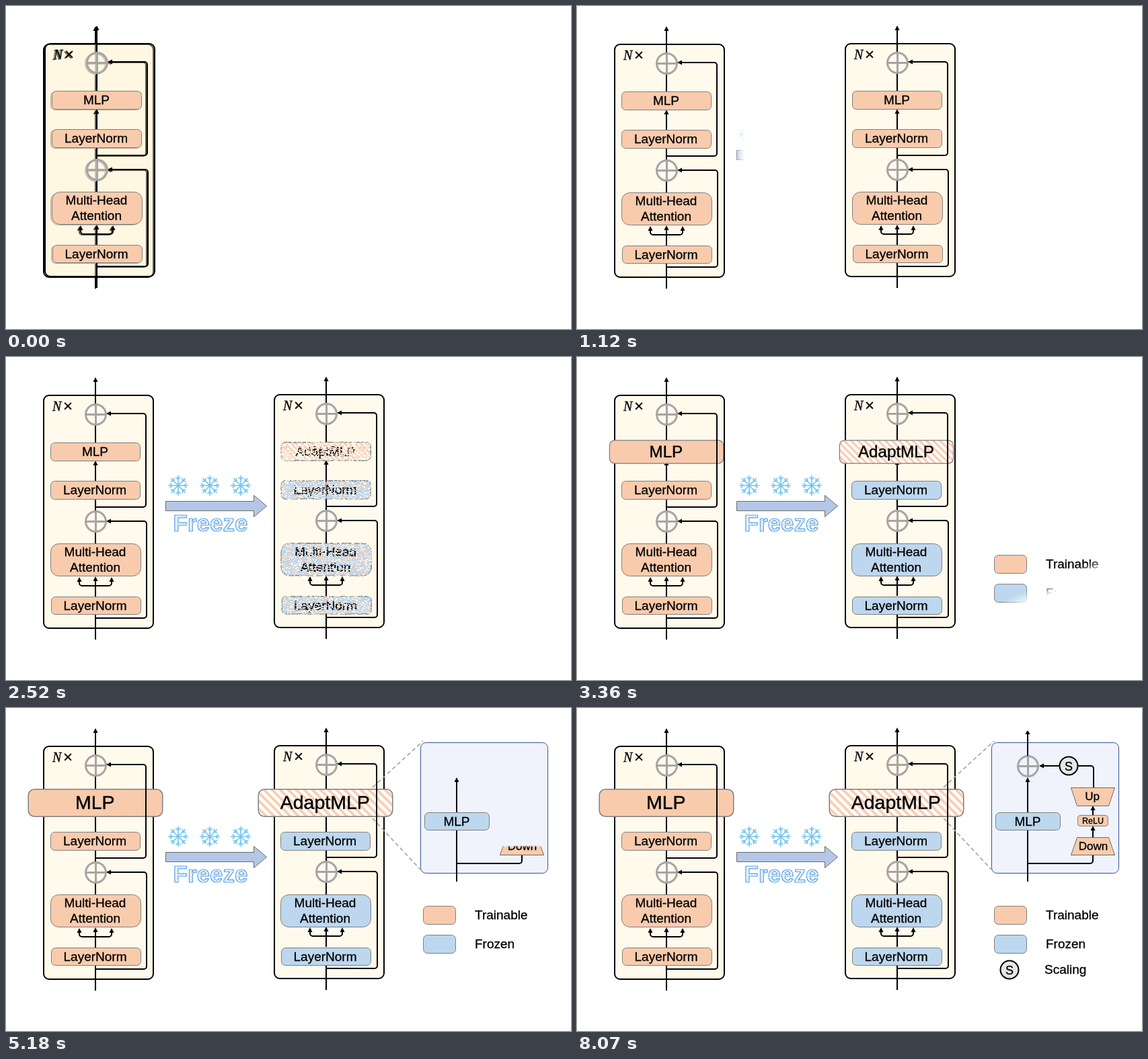
Write an HTML page with a canvas that moves like this. It is 840 by 480 pixels and loops after 8140 ms.

```html
<!DOCTYPE html>
<html lang="en">
<head>
<meta charset="utf-8">
<title>AdaptMLP</title>
<style>
  html, body { margin: 0; width: 100%; height: 100%; overflow: hidden; background: #fff; }
  canvas { display: block; }
</style>
</head>
<body>
<canvas id="stage" width="840" height="480"></canvas>
<script>
const LOOP = 8140, STEP = 70;
const PEACH = '#f8cbad', BLUE = '#bdd7ee', GREY = '#a5a5a5', EDGE = '#7f7f7f';
const SANS = '"Liberation Sans", Arial, sans-serif';
const SERIF = '"Liberation Serif", "Times New Roman", serif';

const screen = document.getElementById('stage').getContext('2d');
const layer = newCanvas(840, 480);
let g = screen, now = 0;

function newCanvas(w, h) {
  const c = document.createElement('canvas');
  c.width = w;
  c.height = h;
  return c.getContext('2d');
}

const progress = (from, to) => Math.min(1, Math.max(0, (now - from) / (to - from)));

// Diagonal hatching running down to the right
function hatch(size, width, color) {
  const c = newCanvas(size, size);
  c.fillStyle = '#fff';
  c.fillRect(0, 0, size, size);
  c.strokeStyle = color;
  c.lineWidth = width;
  for (const k of [-size, 0, size]) {
    c.moveTo(k - size, -size);
    c.lineTo(k + 2 * size, 2 * size);
  }
  c.stroke();
  return c.createPattern(c.canvas, 'repeat');
}
const STRIPES = hatch(8, 2.6, PEACH), FINE = hatch(4, 1, '#9cc8f0');

function paint(fill, stroke, width = 1) {
  if (fill) { g.fillStyle = fill; g.fill(); }
  if (stroke) { g.strokeStyle = stroke; g.lineWidth = width; g.stroke(); }
}

// A hairline outline gives the slightly heavy text weight
function text(str, x, y, size = 19, align = 'center', font = `${size}px ${SANS}`) {
  g.font = font;
  g.textAlign = align;
  g.fillStyle = g.strokeStyle = '#000';
  g.lineWidth = 0.3;
  g.fillText(str, x, y);
  g.strokeText(str, x, y);
}

function box(x, y, w, h, r, fill, stroke = EDGE, width = 1) {
  g.beginPath();
  g.roundRect(x, y, w, h, r);
  paint(fill, stroke, width);
}

function polygon(points, fill, stroke = EDGE) {
  g.beginPath();
  points.forEach(([x, y]) => g.lineTo(x, y));
  g.closePath();
  paint(fill, stroke);
}

// Polyline with rounded corners
function line(...points) {
  g.beginPath();
  g.moveTo(...points[0]);
  for (let i = 1; i < points.length - 1; i++) g.arcTo(...points[i], ...points[i + 1], 4);
  g.lineTo(...points.at(-1));
  paint(null, '#000', 2);
}

function arrow(...points) {
  const [x, y] = points.at(-1), [px, py] = points.at(-2);
  const ux = Math.sign(x - px), uy = Math.sign(y - py);
  const bx = x - 7 * ux, by = y - 7 * uy;
  line(...points.slice(0, -1), [bx, by]);
  polygon([[x, y], [bx + 3.5 * uy, by + 3.5 * ux], [bx - 3.5 * uy, by - 3.5 * ux]], '#000', null);
}

function plus(x, y) {
  g.beginPath();
  g.arc(x, y, 15, 0, 7);
  g.moveTo(x - 15, y);
  g.lineTo(x + 15, y);
  g.moveTo(x, y - 15);
  g.lineTo(x, y + 15);
  paint(null, GREY, 3);
}

function scaleSign(x, y) {
  g.beginPath();
  g.arc(x, y, 13.5, 0, 7);
  paint('#e7e6e6', '#000', 2);
  text('S', x, y + 6.5, 18);
}

// Runs draw on a separate layer, masks it, then puts it on the stage
function masked(draw, mask) {
  const main = g;
  g = layer;
  g.resetTransform();
  g.clearRect(0, 0, 840, 480);
  g.setTransform(main.getTransform());
  draw();
  g.resetTransform();
  mask();
  g = main;
  g.save();
  g.resetTransform();
  g.drawImage(layer.canvas, 0, 0);
  g.restore();
}

// Soft-edged reveal from point a to point b
function wipe(from, to, [ax, ay], [bx, by], draw, soft = 0.1) {
  const p = progress(from, to);
  if (p === 0) return;
  if (p === 1) return draw();
  masked(draw, () => {
    const head = p * (1 + soft), tail = head - soft;
    const at = k => [ax + (bx - ax) * k, ay + (by - ay) * k];
    const fade = g.createLinearGradient(...at(tail), ...at(head));
    fade.addColorStop(0, '#000');
    fade.addColorStop(1, 'transparent');
    g.globalCompositeOperation = 'destination-in';
    g.fillStyle = fade;
    g.fillRect(0, 0, 840, 480);
    g.globalCompositeOperation = 'source-over';
  });
}

// Keeps a random share of the pixels in the right-hand block
function dissolve(share, seed, draw) {
  if (share === 0) return;
  if (share === 1) return draw();
  masked(draw, () => {
    for (let y = 120; y < 390; y++) {
      for (let x = 404; x < 548; x += 2) {
        seed = (seed * 16807) % 2147483647;
        if (seed / 2147483647 > share) g.clearRect(x, y, 2, 1);
      }
    }
  });
}

function mlpBox(label, fill) {
  const s = 1 + 0.5 * progress(2870, 3770);
  g.save();
  g.translate(133, 141);
  g.scale(s, s);
  box(-66.5, -13.5, 133, 27, 6, fill);
  text(label, -0.5, 6.2);
  g.restore();
}

function layers(fill, mlpLabel, mlpFill) {
  box(66.5, 184.5, 133, 27, 6, fill);
  text('LayerNorm', 132, 204);
  box(66.5, 277.5, 134, 48, 12, fill);
  text('Multi-Head', 132.5, 296);
  text('Attention', 132.5, 319);
  box(67.5, 356.5, 133, 26, 6, fill);
  text('LayerNorm', 132.5, 376);
  mlpBox(mlpLabel, mlpFill);
}

function block(x, y, drawLayers) {
  g.save();
  g.translate(x, y);
  box(56, 57, 163, 346, 8, 'rgba(255,242,204,.38)', '#000', 2);
  text('N', 69, 80, 20, 'left', `italic 20px ${SERIF}`);
  text('×', 85, 81, 24, 'left');

  arrow([133, 127], [133, 30]);
  arrow([133, 212], [133, 154]);
  line([133, 278], [133, 212]);
  line([133, 420], [133, 383]);
  arrow([133, 356], [133, 326]);
  arrow([133, 340], [109, 340], [109, 327]);
  arrow([133, 340], [157, 340], [157, 327]);
  plus(133.5, 85.5);
  plus(133.5, 244.5);
  drawLayers();
  arrow([133, 223], [208, 223], [208, 84], [149, 84]);
  arrow([133, 388], [209, 388], [209, 244], [149, 244]);
  g.restore();
}

function rightLayers() {
  const p = progress(2200, 2760);
  dissolve(1 - p, 11, () => layers(PEACH, 'MLP', PEACH));
  g.translate(-p, p);
  dissolve(p, 7, () => layers(BLUE, 'AdaptMLP', STRIPES));
  g.translate(p, -p);
}

function snowflake(x, y) {
  g.save();
  g.translate(x, y);
  g.beginPath();
  for (let i = 0; i < 8; i++) {
    g.moveTo(0, 0);
    g.lineTo(15, 0);
    g.moveTo(12.5, -3.5);
    g.lineTo(9, 0);
    g.lineTo(12.5, 3.5);
    g.rotate(Math.PI / 4);
  }
  paint(null, '#74c6f0', 1.7);
  g.restore();
}

function freeze() {
  [256, 303, 349].forEach(x => snowflake(x, 191));
  polygon([[237.5, 214.5], [368.5, 214.5], [368.5, 205.5], [387.5, 221.5],
    [368.5, 237.5], [368.5, 228.5], [237.5, 228.5]], '#b4c7e7', '#6b6b6b');
  g.font = `bold 35px ${SANS}`;
  g.textAlign = 'center';
  g.lineJoin = 'round';
  g.fillStyle = FINE;
  g.fillText('Freeze', 304, 258.5);
  g.strokeStyle = '#5ba3e2';
  g.lineWidth = 1.2;
  g.strokeText('Freeze', 304, 258.5);
  g.lineJoin = 'miter';
}

function legend() {
  [[PEACH, 'Trainable', 294.5], [BLUE, 'Frozen', 337.5]].forEach(([fill, label, y]) => {
    box(620.5, y, 48, 27, 6, fill);
    text(label, 697, y + 19.5, 19, 'left');
  });
}

function guides() {
  g.setLineDash([6, 4]);
  g.beginPath();
  g.moveTo(545, 118);
  g.lineTo(620, 49);
  g.moveTo(545, 164);
  g.lineTo(616, 240);
  paint(null, '#a6a6a6', 1.7);
  g.setLineDash([]);
}

function detail() {
  wipe(4230, 4550, [616, 0], [806, 0], () => box(616.5, 51.5, 189, 194, 8, '#f0f3fb', '#2f5597'));
  wipe(4550, 4800, [0, 258], [0, 103], () => {
    arrow([670, 258], [670, 103]);
    box(622.5, 155.5, 96, 26, 6, BLUE);
    text('MLP', 670, 175);
  });
  wipe(4800, 5040, [669, 0], [768, 0], () => line([670, 231], [767, 231], [767, 219]));
  wipe(5050, 5310, [0, 219], [0, 192], () => {
    polygon([[743.5, 192.5], [790.5, 192.5], [799.5, 218.5], [734.5, 218.5]], PEACH, '#6b6b6b');
    text('Down', 767.5, 211, 17);
  });
  wipe(5560, 5860, [0, 192], [0, 175], () => arrow([767, 192], [767, 175]));
  wipe(5890, 6150, [0, 176], [0, 159], () => {
    box(744.5, 159.5, 45, 16, 4, PEACH);
    text('ReLU', 767, 172, 12.5);
  });
  wipe(6250, 6520, [0, 159], [0, 144], () => arrow([767, 159], [767, 145]));
  wipe(6600, 6960, [0, 145], [0, 118], () => {
    polygon([[734.5, 118.5], [799.5, 118.5], [790.5, 145.5], [743.5, 145.5]], PEACH, '#6b6b6b');
    text('Up', 766, 137, 17);
  });
  wipe(7060, 7330, [0, 118], [0, 85], () => line([768, 118], [768, 86], [744, 86]));
  wipe(7330, 7600, [0, 100], [0, 72], () => scaleSign(731, 86));
  wipe(7330, 7600, [628, 0], [758, 0], () => {
    scaleSign(643, 389);
    text('Scaling', 695, 395, 19, 'left');
  });
  wipe(7600, 7870, [718, 0], [654, 0], () => {
    arrow([718, 86], [687, 86]);
    plus(670.5, 86.5);
  });
  wipe(7900, 8065, [0, 71], [0, 32], () => arrow([670, 71], [670, 32]));
}

// Distance of the copied block: speeds up, then moves evenly
function slide() {
  const speed = 0.473, ramp = 317;
  return now < ramp
    ? 2 + speed * now * now / (2 * ramp)
    : Math.min(343, 2 + speed * (now - ramp / 2));
}

function frame(time) {
  now = Math.floor((time % LOOP) / STEP) * STEP;
  g.fillStyle = '#fff';
  g.fillRect(0, 0, 840, 480);
  block(0, 0, () => layers(PEACH, 'MLP', PEACH));
  block(slide(), -1, rightLayers);
  wipe(1040, 2158, [237, 0], [388, 0], freeze);
  wipe(2870, 3700, [620, 294], [673.5, 411.6], legend, 0.16);
  wipe(3850, 4200, [544, 0], [621, 0], guides);
  detail();
}

const start = performance.now();
function tick() {
  frame(performance.now() - start);
  requestAnimationFrame(tick);
}
tick();
</script>
</body>
</html>
```
